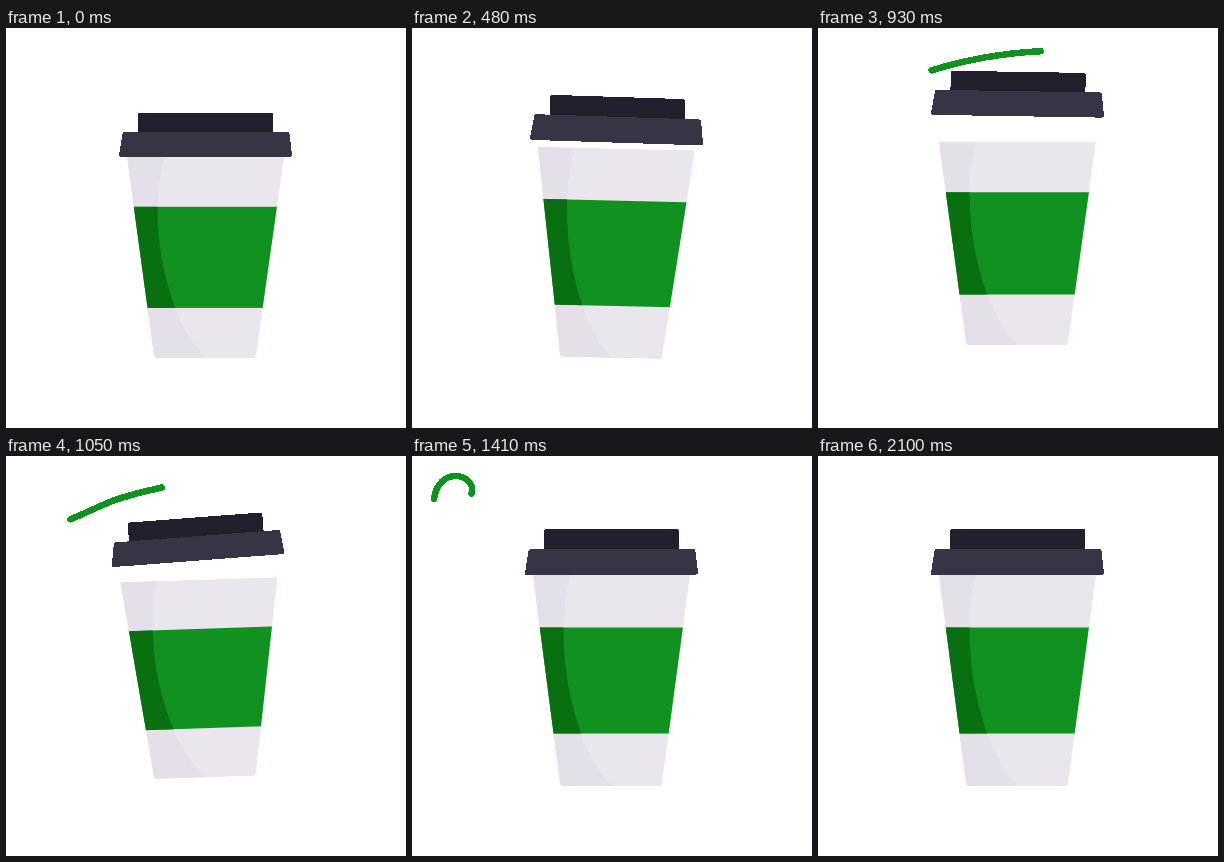
Write an HTML page that moves like this. It is 400 px wide and 400 px high and loops after 4460 ms.

```html
<!DOCTYPE html>
<html lang="en">
<head>
<meta charset="utf-8">
<title>Coffee cup hop</title>
<style>
  html, body { margin: 0; width: 100%; height: 100%; overflow: hidden; background: #fff; }
  svg { display: block; width: 100%; height: 100%; }
</style>
</head>
<body>
<svg viewBox="0 0 400 400">
  <defs>
    <clipPath id="cupClip"><path id="cupShape"/></clipPath>
    <path id="shade" d="M100 115H158V119C145 172 153 232 169 277Q181 311 200 330H100Z"/>
    <clipPath id="shadeClip"><use href="#shade"/></clipPath>
  </defs>
  <path id="swoosh" fill="none" stroke="#11911f" stroke-width="6.5" stroke-linecap="round"
    shape-rendering="crispEdges"
    d="M324 99Q331 94 336 88C353 70 344 52 327 40C307 26 281 20 249 22Q237 22 226 23
       C186 25 150 31 115 42C98 47 79 58 60 65C47 70 34 66 25 55C21 50 21 47 22 43
       C24 27 34 20 44 20S61 28 60 35C58 50 44 56 28 57L-8 54"/>
  <g id="cup">
    <g clip-path="url(#cupClip)">
      <rect x="100" y="119" width="200" height="211" fill="#ebe6ed"/>
      <use href="#shade" fill="#e4dfe9"/>
      <rect x="100" y="171.5" width="200" height="106" fill="#11911f"/>
      <rect x="100" y="171.5" width="200" height="106" fill="#087011" clip-path="url(#shadeClip)"/>
    </g>
    <g id="lid" stroke-width="4" stroke-linejoin="round" shape-rendering="crispEdges">
      <path d="M134 75H265V94H134Z" fill="#231f2c" stroke="#231f2c"/>
      <path d="M118.5 95H281.5L284 117H115Z" fill="#393445" stroke="#393445"/>
    </g>
  </g>
</svg>
<script>
const LOOP = 4460, STEP = 30, REST = 2100;
const $ = id => document.getElementById(id);
const cup = $('cup'), lid = $('lid'), cupShape = $('cupShape'), swoosh = $('swoosh');
const pathLength = swoosh.getTotalLength();

// One sine hump between two times, zero outside.
const hump = (t, from, to) =>
  t > from && t < to ? Math.sin(Math.PI * (t - from) / (to - from)) : 0;

// One damped swing: first right, then left by the factor `damping`.
const SWING = 480;
function swing(t, from, angle, damping) {
  const u = (t - from) / SWING;
  return u > 0 && u < 2 ? angle * Math.sin(Math.PI * u) * damping ** (u - .5) : 0;
}

// Distance along the path, slowing down towards a limit.
const glide = (t, from, limit, keep) =>
  Math.min(pathLength, Math.max(0, limit * (1 - keep ** ((t - from) / 240))));

function draw(time) {
  const t = Math.min(Math.floor(time / STEP) * STEP, REST);

  const crouch = .102 * hump(t, -70, 400);
  const airborne = .037 * hump(t, 430, 1250);
  const landing = .055 * hump(t, 950, 1390);
  const stretch = 1 - crouch - airborne - landing;
  const bulge = 18 * hump(t, 0, 400);
  const rise = 13.5 * hump(t, 480, 1260) ** 1.6;
  const lift = 27.3 * hump(t, 420, 1280);
  const tilt = swing(t, 450, 4.8, .458);
  const lidTilt = swing(t, 475, 9.6, .34);

  cupShape.setAttribute('d',
    `M121 119H278Q${264 + bulge} 223 250 327Q249.5 330 247 330H151` +
    `Q148.5 330 148 327Q${134.5 - bulge} 223 121 119Z`);
  cup.setAttribute('transform',
    `translate(0 ${-rise}) rotate(${tilt} 199.5 330) ` +
    `translate(0 330) scale(1 ${stretch}) translate(0 -330)`);
  lid.setAttribute('transform', `translate(0 ${-lift}) rotate(${lidTilt} 199.5 119)`);

  const head = glide(t, 482, 664, .733), tail = glide(t, 670, 705, .76);
  swoosh.style.display = head > tail ? '' : 'none';
  swoosh.setAttribute('stroke-dasharray', `${Math.max(head - tail, .01)} 2000`);
  swoosh.setAttribute('stroke-dashoffset', -tail);
}

const start = performance.now();
function tick() {
  draw((performance.now() - start) % LOOP);
  requestAnimationFrame(tick);
}
tick();
</script>
</body>
</html>
```
